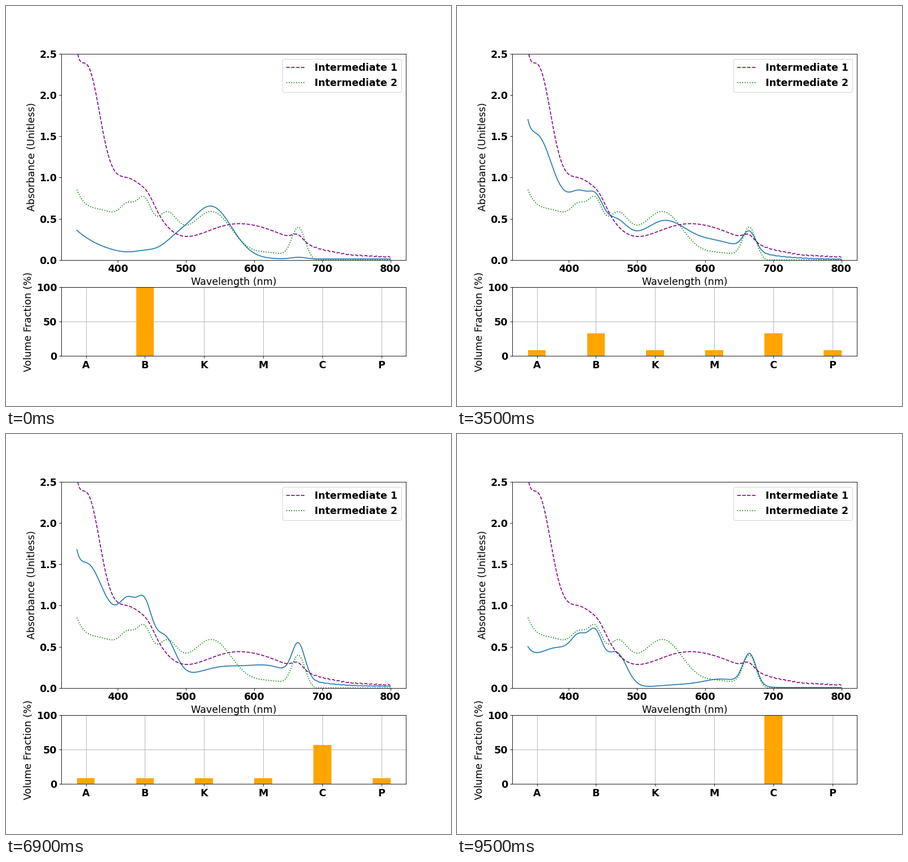
A matplotlib script that plays this animation: 789 by 710 pixels, repeating every 9.6 s.

```python
import numpy as np
import matplotlib.pyplot as plt
from matplotlib.animation import FuncAnimation

WIDTH, HEIGHT, DPI = 789, 710, 78.9
FRAMES, INTERVAL = 96, 100
HALF, EVEN, LAST = 25, 45, 95  # steps where the mixing path turns

plt.rcParams.update({"font.family": "DejaVu Sans", "font.size": 16,
                     "font.weight": "bold"})

NM = np.arange(340, 801)


def band(center, height, width, right=None):
    """Gaussian absorption band, optionally wider on its right side."""
    sigma = np.where(NM < center, width, right or width)
    return height * np.exp(-((NM - center) / sigma) ** 2 / 2)


def decay(height, length):
    """Ultraviolet edge falling off exponentially."""
    return height * np.exp(-(NM - 340) / length)


dye_b = (decay(.347, 47) + band(440, .05, 16) + band(484, .155, 20)
         + band(537, .632, 30) + band(665, .02, 10))
dye_c = (decay(.29, 14) + band(385, .47, 35) + band(416, .30, 11.5)
         + band(439, .48, 10.5) + band(470, .40, 15) + band(560, .03, 30)
         + band(625, .10, 28) + band(665.2, .378, 9.7))
ripple = .005 * np.sin(2 * np.pi * (NM - 690) / 8) * (NM > 686)
even_mix = (decay(.86, 7.5) + band(354, 1.97, 20) + band(415, .93, 37)
            + band(445, .06, 9) + band(578, .405, 62, 71)
            + band(664, .08, 8) + .035 + ripple)
PARTS = np.array([dye_b, dye_c, even_mix, decay(.08, 30), np.ones(len(NM))])


def weights(step):
    """Share of dye B, dye C, even mix, UV excess and flat offset."""
    if step <= HALF:
        u = step / HALF
        return np.array([1 + .31 * u - .4 * u**2, .96 * u**1.3, 0,
                         u**.5, .012 - .03 * u**2])
    if step < EVEN:
        u = (step - HALF) / (EVEN - HALF)
        return (1 - u) * weights(HALF) + u * weights(EVEN)
    u = (step - EVEN) / (LAST - EVEN)
    return np.array([.28 * u * (1 - u), 3 * u - 2 * u**2, (1 - u)**1.2,
                     0, .005 * u])


def absorbance(step):
    return np.maximum(weights(step) @ PARTS, 0)


def fractions(step):
    """Volume fractions (%) of the six dyes, in bar order."""
    def path(*values):
        return np.interp(step, [0, HALF, EVEN, LAST], values)

    even = 100 / 6
    other = path(0, 0, even, 0)
    return [other, path(100, 50, even, 0), other, other,
            path(0, 50, even, 100), other]


fig, (top, low) = plt.subplots(
    2, 1, figsize=(WIDTH / DPI + 1e-9, HEIGHT / DPI + 1e-9), dpi=DPI,
    gridspec_kw={"height_ratios": [3, 1], "left": 98 / WIDTH,
                 "right": 709.3 / WIDTH, "top": .88, "bottom": .125,
                 "hspace": .2})

mix_line, = top.plot(NM, absorbance(0), color="tab:blue")
top.plot(NM, absorbance(EVEN), "--", color="purple", label="Intermediate 1")
top.plot(NM, absorbance(HALF), ":", color="green", label="Intermediate 2")
top.set_xlim(317, 823)
top.set_ylim(0, 2.5)
top.set_xlabel("Wavelength (nm)")
top.set_ylabel("Absorbance (Unitless)")
top.legend(loc="upper right")

bars = low.bar(list("ABKMCP"), fractions(0), width=.3, color="orange")
low.set_axisbelow(True)
low.grid(True)
low.set_xlim(-.415, 5.415)
low.set_ylim(0, 100)
low.set_yticks([0, 50, 100])
low.set_ylabel("Volume Fraction (%)")


def update(step):
    mix_line.set_ydata(absorbance(step))
    for bar, height in zip(bars, fractions(step)):
        bar.set_height(height)
    return [mix_line, *bars]


anim = FuncAnimation(fig, update, frames=FRAMES, interval=INTERVAL, repeat=True)
plt.show()
```
